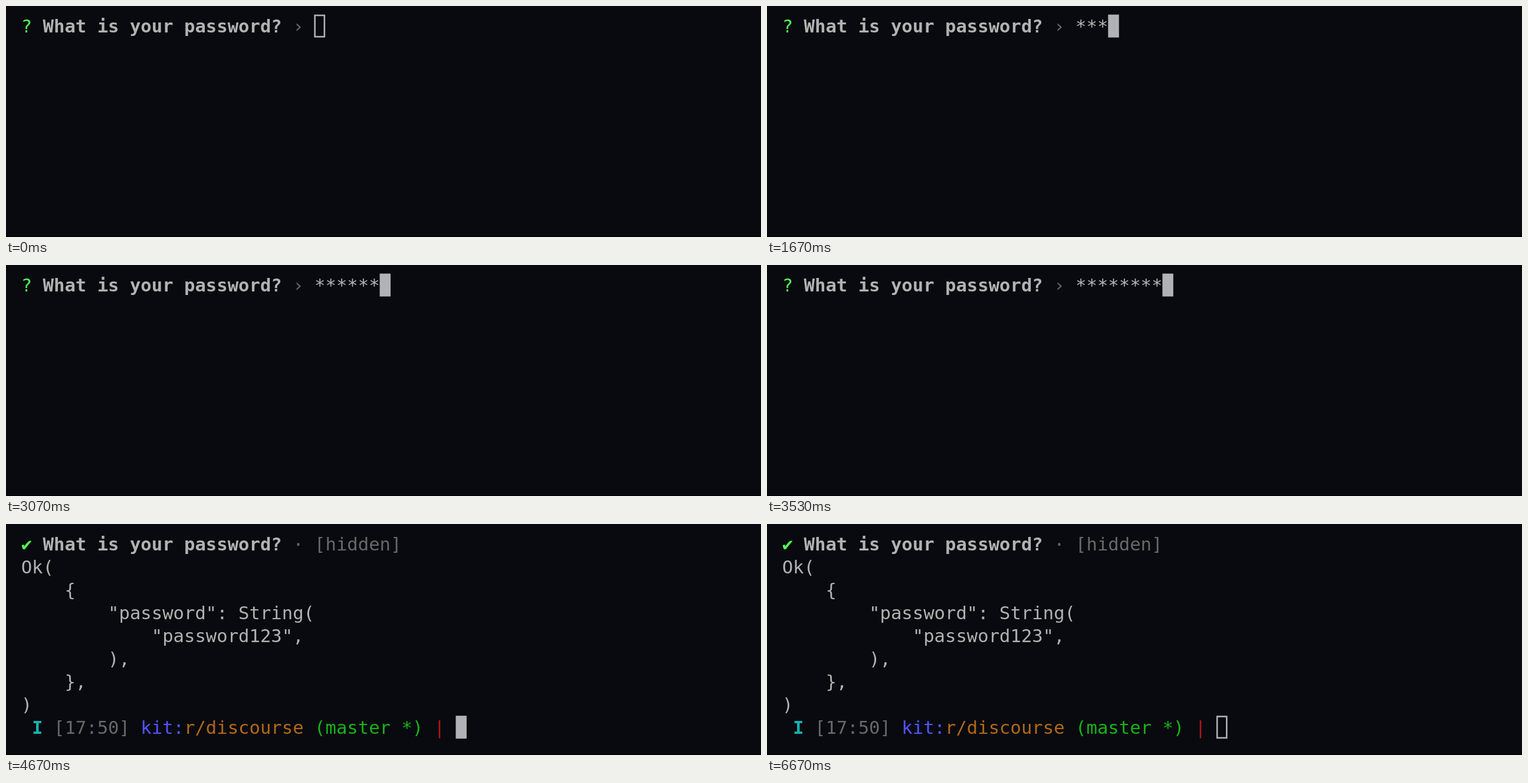
An HTML page with a canvas for the animation above (7070 ms loop, 1280 px wide and 393 px high).

```html
<!DOCTYPE html>
<html lang="en">
<head>
<meta charset="utf-8">
<title>Password prompt</title>
<style>
  html, body { margin: 0; height: 100%; overflow: hidden; background: #090a0f; }
  canvas { display: block; }
</style>
</head>
<body>
<canvas id="stage" width="1280" height="393"></canvas>
<script>
const ctx = document.getElementById('stage').getContext('2d');

const LOOP = 7070;
const CELL = { w: 18.42, h: 38.95, left: 25.7, top: 14.6, baseline: 30.4 };
const FONT = '30.6px "DejaVu Sans Mono", "DejaVu Sans", monospace';
const COLOR = {
  back: '#090a0f', text: '#b2b2b2', cursor: '#b2b1b6', dim: '#686868', bright: '#54ff54',
  cyan: '#18b2b2', blue: '#5454ff', orange: '#b26818', green: '#18b218', red: '#b21818'
};

// Times in ms
const FOCUS = 470, SUBMIT = 4470, PROMPT = 4530, BLUR = 6470;
const KEYS = [1400, 1530, 1670, 1870, 2070, 3070, 3270, 3470, 3730, 3870, 4000];

const OUTPUT = [
  'Ok(',
  '    {',
  '        "password": String(',
  '            "password123",',
  '        ),',
  '    },',
  ')'
];

const cellX = col => CELL.left + col * CELL.w;
const cellY = row => CELL.top + row * CELL.h;

// Writes text on the terminal grid and returns the next free column
function write(text, col, row, color = COLOR.text, bold = false) {
  ctx.font = (bold ? 'bold ' : '') + FONT;
  ctx.fillStyle = color;
  for (const char of text) ctx.fillText(char, cellX(col++), cellY(row) + CELL.baseline);
  return col;
}

function drawCursor(col, row, focused) {
  const x = cellX(col), y = cellY(row);
  if (focused) {
    ctx.fillStyle = COLOR.cursor;
    ctx.fillRect(x, y, CELL.w, CELL.h);
  } else {
    ctx.strokeStyle = COLOR.cursor;
    ctx.lineWidth = 2.6;
    ctx.strokeRect(x - 0.7 + 1.3, y + 1.3, CELL.w - 2.2, CELL.h - 2.6);
  }
}

function drawQuestion(mark, separator) {
  write(mark, 0, 0, COLOR.bright);
  const col = write('What is your password?', 2, 0, COLOR.text, true);
  return write(` ${separator} `, col, 0, COLOR.dim);
}

function drawShellPrompt(row) {
  let col = write('I', 1, row, COLOR.cyan, true);
  const parts = [
    [' [17:50] ', COLOR.dim], ['kit:', COLOR.blue], ['r/discourse', COLOR.orange],
    [' (master *)', COLOR.green], [' | ', COLOR.red]
  ];
  for (const [text, color] of parts) col = write(text, col, row, color);
  return col;
}

function draw(t) {
  ctx.fillStyle = COLOR.back;
  ctx.fillRect(0, 0, 1280, 393);
  ctx.fillStyle = '#000';
  ctx.fillRect(0, 392, 1280, 1);

  const focused = t >= FOCUS && t < BLUR;
  if (t < SUBMIT) {
    const typed = KEYS.filter(time => time <= t).length;
    const col = write('*'.repeat(typed), drawQuestion('?', '›'), 0);
    drawCursor(col, 0, focused);
  } else {
    write('[hidden]', drawQuestion('✔', '·'), 0, COLOR.dim);
    OUTPUT.forEach((line, i) => write(line, 0, i + 1));
    const row = OUTPUT.length + 1;
    drawCursor(t < PROMPT ? 0 : drawShellPrompt(row), row, focused);
  }
}

const start = performance.now();
function tick() {
  draw((performance.now() - start) % LOOP);
  requestAnimationFrame(tick);
}
tick();
</script>
</body>
</html>
```
